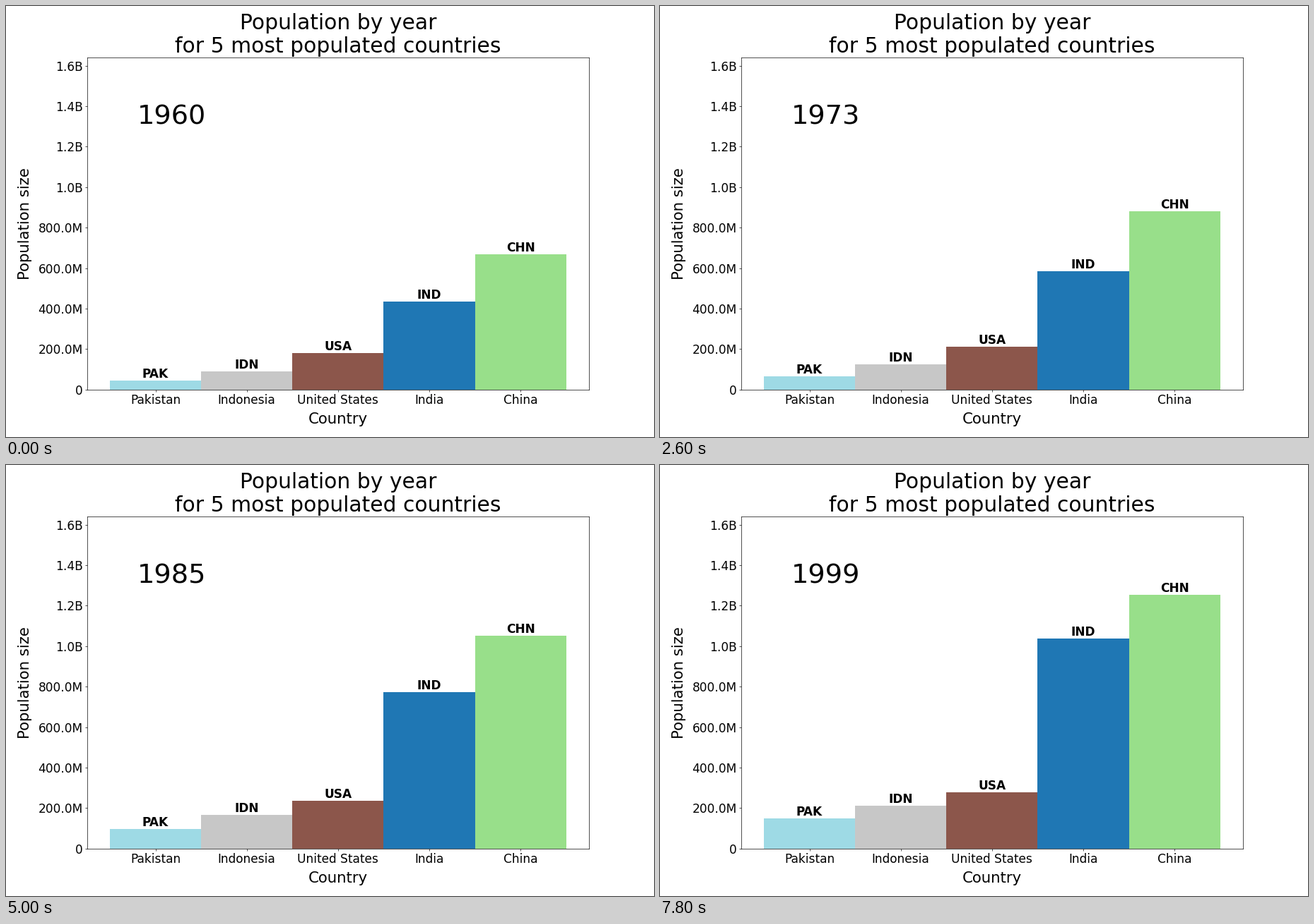
Recreate the animation shown at these times as a matplotlib script. Size 917 by 611 pixels, loop 8000 ms.

```python
import numpy as np
import matplotlib.pyplot as plt
from matplotlib.animation import FuncAnimation
from matplotlib.ticker import FuncFormatter

plt.rcParams["font.family"] = "DejaVu Sans"

DPI = 61.125
YEARS = np.arange(1960, 2000)


def trend(*millions):
    """Smooth growth through the sizes in 1960, 1970, 1980, 1990 and 1999."""
    knots = np.array([0, 10, 20, 30, 39])
    return np.polyval(np.polyfit(knots, millions, 4), YEARS - YEARS[0])


def stages(*points):
    """Steady growth between (year, millions) turning points."""
    return np.interp(YEARS, *zip(*points))


countries = [
    ("Pakistan", "PAK", "#9edae5", trend(45.7, 60, 81, 115.4, 150.5)),
    ("Indonesia", "IDN", "#c7c7c7", trend(88.4, 115.5, 148.2, 183.2, 211.5)),
    ("United States", "USA", "#8c564b", trend(180.7, 205.1, 227.2, 249.6, 279)),
    ("India", "IND", "#1f77b4", trend(436, 545.2, 687.4, 865, 1038.1)),
    ("China", "CHN", "#98df8a",
     stages((1960, 667), (1961, 660), (1962, 666), (1965, 715), (1974, 900),
            (1980, 981), (1985, 1051), (1990, 1135), (1995, 1205), (1999, 1253))),
]
names, codes, colors, series = zip(*countries)
sizes = np.array(series) * 1e6


def short_number(value, _):
    if value >= 1e9:
        return f"{value / 1e9:.1f}B"
    if value >= 1e6:
        return f"{value / 1e6:.1f}M"
    return f"{value:.0f}"


fig, ax = plt.subplots(figsize=(917.01 / DPI, 611.01 / DPI), dpi=DPI)
fig.subplots_adjust(left=0.125, right=0.8998, bottom=0.11, top=0.88)

slots = np.arange(len(names))
bars = ax.bar(slots, sizes[:, 0], width=1, color=colors)
tags = [ax.text(x, 0, code, ha="center", va="bottom", size=20, weight="bold")
        for x, code in zip(slots, codes)]
year_text = ax.text(0.1, 0.8, "", transform=ax.transAxes, size=45)

ax.set_xlim(-0.75, 4.75)
ax.set_ylim(0, 1.639e9)
ax.set_xticks(slots, names)
ax.set_yticks(np.arange(9) * 2e8)
ax.yaxis.set_major_formatter(FuncFormatter(short_number))
ax.tick_params(labelsize=20)
ax.set_xlabel("Country", size=25, labelpad=10)
ax.set_ylabel("Population size", size=25, labelpad=10)
ax.set_title("Population by year\nfor 5 most populated countries", size=35, pad=8.5)


def update(frame):
    for bar, tag, size in zip(bars, tags, sizes[:, frame]):
        bar.set_height(size)
        tag.set_y(size)
    year_text.set_text(str(YEARS[frame]))
    return [*bars, *tags, year_text]


anim = FuncAnimation(fig, update, frames=len(YEARS), interval=200,
                     repeat=True, repeat_delay=0)
plt.show()
```
